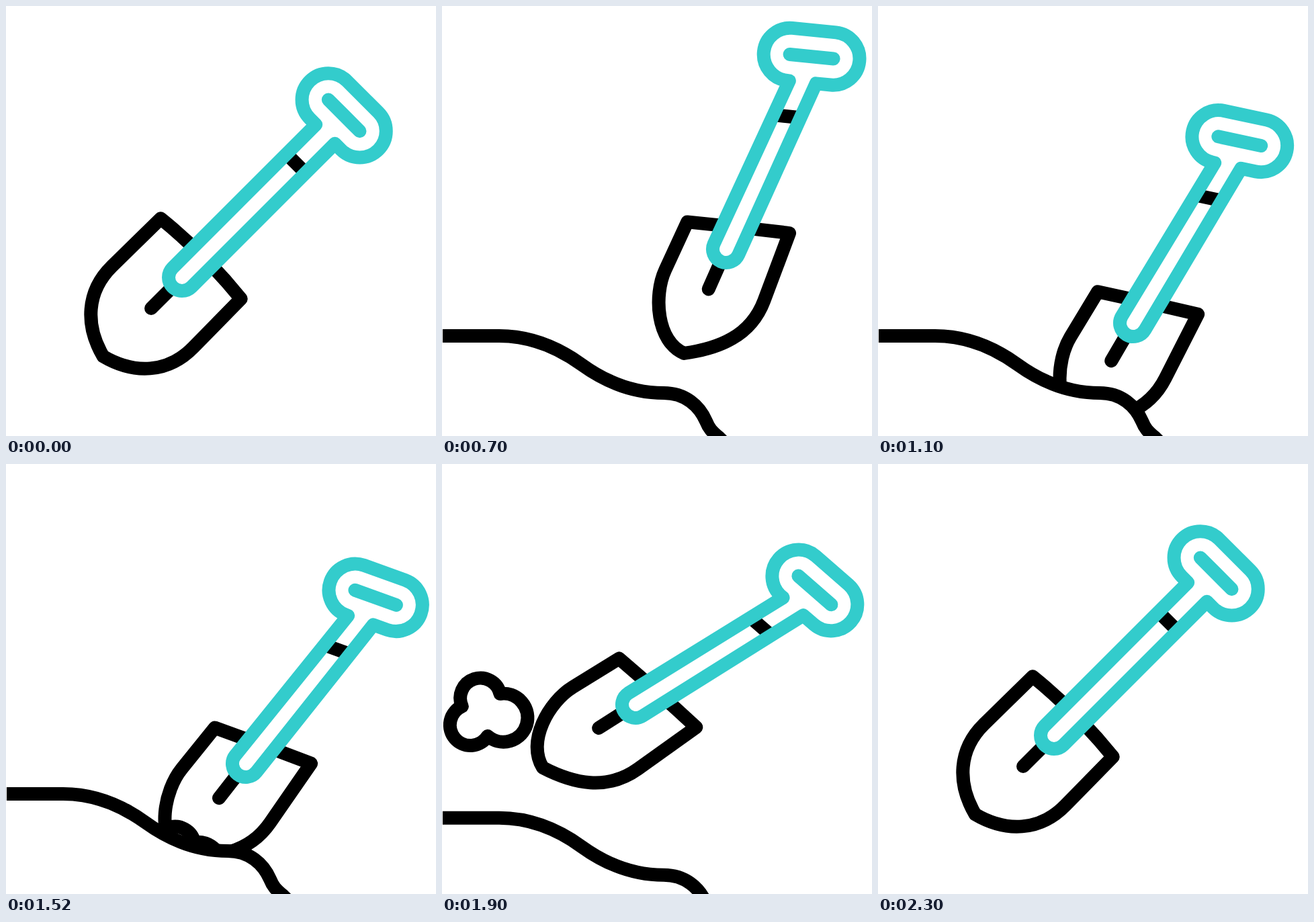
Recreate the animation shown at these times as an HTML page. Size 640x640 px, loop 2.4 s.

```html
<!DOCTYPE html>
<html lang="en">
<head>
<meta charset="utf-8">
<title>Digging shovel</title>
<style>
  html, body { margin: 0; width: 100%; height: 100%; overflow: hidden; background: #fff; }
  svg { display: block; width: 100%; height: 100%; }
  path { fill: none; stroke: #000; stroke-width: 20; stroke-linejoin: round; }
  .fill { fill: #fff; }
  .bare { stroke: none; }
  .round { stroke-linecap: round; }
  .teal { stroke: #3cc; }
</style>
</head>
<body>
<svg viewBox="0 0 640 640">
  <g id="shovel">
    <path id="blade" class="fill"/>
    <path class="round" d="M0 0V65"/>
    <path id="shaftFill" class="fill bare"/>
    <path id="band"/>
    <path id="shaft" class="teal"/>
    <path id="grip" class="teal round"/>
  </g>
  <path id="clod" class="fill" d="M29.8 360.7A30 30 0 1 1 86.5 342A36 36 0 1 1 68 405A30.5 30.5 0 1 1 29.8 360.7Z"/>
  <g id="ground">
    <path class="fill bare" d="M1 491H85C135 491 175 510 207.5 533.5S280 576 330 576C362 576 383 595 393 618C397 628 401 633 412 642V900H1Z"/>
    <path d="M1 491H85C135 491 175 510 207.5 533.5S280 576 330 576C362 576 383 595 393 618C397 628 401 633 412 642L422 652"/>
  </g>
</svg>
<script>
const LOOP = 2400, STEP = 20;
const el = id => document.getElementById(id);
const set = (id, d) => el(id).setAttribute('d', d);
const clamp = x => Math.min(1, Math.max(0, x));

// Time, foot of the shaft (x, y), turn in degrees, tilt towards the viewer's side
const keys = [
  [120, 262, 404, 45, 0],      // rest
  [380, 331, 380, 35.7, .48],  // lift
  [700, 423, 362, 23.9, 1],    // highest point
  [860, 432, 397, 24, 1],      // plunge
  [1100, 380, 472, 30.3, 1],   // in the ground
  [1520, 357, 446, 38, 1],     // pry
  [1900, 288, 358, 57.5, .9],  // toss
  [2300, 262, 404, 45, 0]
];

// Smooth curve through all keys, at rest at both ends
function slope(k, i) {
  const a = keys[k - 1], b = keys[k + 1];
  return a && b ? (b[i] - a[i]) / (b[0] - a[0]) : 0;
}
function poseAt(t) {
  let k = 0;
  while (k < keys.length - 2 && t >= keys[k + 1][0]) k++;
  const a = keys[k], b = keys[k + 1], d = b[0] - a[0];
  const u = clamp((t - a[0]) / d), w = 1 - u;
  return [1, 2, 3, 4].map(i =>
    a[i] * w * w * (1 + 2 * u) + b[i] * u * u * (3 - 2 * u) +
    d * u * w * (w * slope(k, i) - u * slope(k + 1, i)));
}

// Point helpers
const add = (p, v, s = 1) => [p[0] + v[0] * s, p[1] + v[1] * s];
const sub = (p, q) => add(p, q, -1);
const mid = (p, q) => [(p[0] + q[0]) / 2, (p[1] + q[1]) / 2];
const unit = p => add([0, 0], p, 1 / Math.hypot(...p));
const at = p => p[0].toFixed(2) + ' ' + p[1].toFixed(2) + ' ';
const line = (p, q) => 'M' + at(p) + 'L' + at(q);
const arc = (r, p) => `A${r} ${r} 0 0 1 ` + at(p);

// The shovel stands upright on its shaft's foot at 0,0
function drawBlade(tilt) {
  const pt = (x, y, dx, dy) => [x + dx * tilt, y + dy * tilt];
  const left = pt(-84.5, -39.5, 15.2, 25.8), right = pt(84.5, -39.5, -8.2, -20.5);
  const hipL = pt(-85.5, 62, 15, 3), hipR = pt(85.5, 62, -3, -15);
  const tip = pt(0, 166, 5.5, 1), top = mid(left, right);
  const depth = sub(tip, top), half = sub(left, top);
  const bend = (hip, corner) => add(hip, sub(hip, corner), .53);
  const nose = k => add(add(tip, depth, -.065), half, k);
  set('blade',
    'M' + at(left) + 'L' + at(hipL) +
    'C' + at(bend(hipL, left)) + at(nose(.61)) + at(tip) +
    'C' + at(nose(-.61)) + at(bend(hipR, right)) + at(hipR) +
    'L' + at(right) + 'Q' + at(add(top, [0, 8 * tilt - 9])) + at(left) + 'Z');
}

function drawHandle(tilt) {
  const R = 39.3, w = 33 - 2 * tilt, h = 341 - 27.3 * tilt;
  const g1 = [-w, 10.2 * tilt - h], g2 = [w, -10.2 * tilt - h];
  const g = unit(sub(g2, g1)), n = [g[1], -g[0]];
  const low = add(g1, n, -R);
  // The shaft opens the ring on its lower side
  const neck = add(low, g, -low[0] / g[0] - 11 * g[1]);
  const d = 'M-20 0L' + at(add(neck, g, -20)) +
    'L' + at(low) + arc(R, add(g1, n, R)) +
    'L' + at(add(g2, n, R)) + arc(R, add(g2, n, -R)) +
    'L' + at(add(neck, g, 20)) + 'L20 0' + arc(20, [-20, 0]) + 'Z';
  set('shaft', d);
  set('shaftFill', d);
  set('grip', line(g1, g2));
  const b = [0, neck[1] + .181 * h];
  set('band', line(add(b, g, -18), add(b, g, 18)));
}

function drawEarth(t) {
  const drop = t < 1000
    ? 159 * (1 - clamp((t - 120) / 520)) ** 1.7
    : 170 * clamp((t - 1660) / 600) ** 1.7;
  el('ground').setAttribute('transform', `translate(0 ${drop})`);

  const s = (t - 1520) / 380;
  el('clod').setAttribute('transform',
    `translate(${194 * (1 - s)} ${221 - 260 * s + 39 * s * s})`);
  el('clod').setAttribute('visibility', s > -.3 && s < 1.8 ? 'visible' : 'hidden');
}

const start = performance.now();
function frame() {
  const t = Math.floor((performance.now() - start) % LOOP / STEP) * STEP;
  const [x, y, turn, tilt] = poseAt(t);
  el('shovel').setAttribute('transform', `translate(${x} ${y}) rotate(${turn})`);
  drawBlade(tilt);
  drawHandle(tilt);
  drawEarth(t);
  requestAnimationFrame(frame);
}
frame();
</script>
</body>
</html>
```
